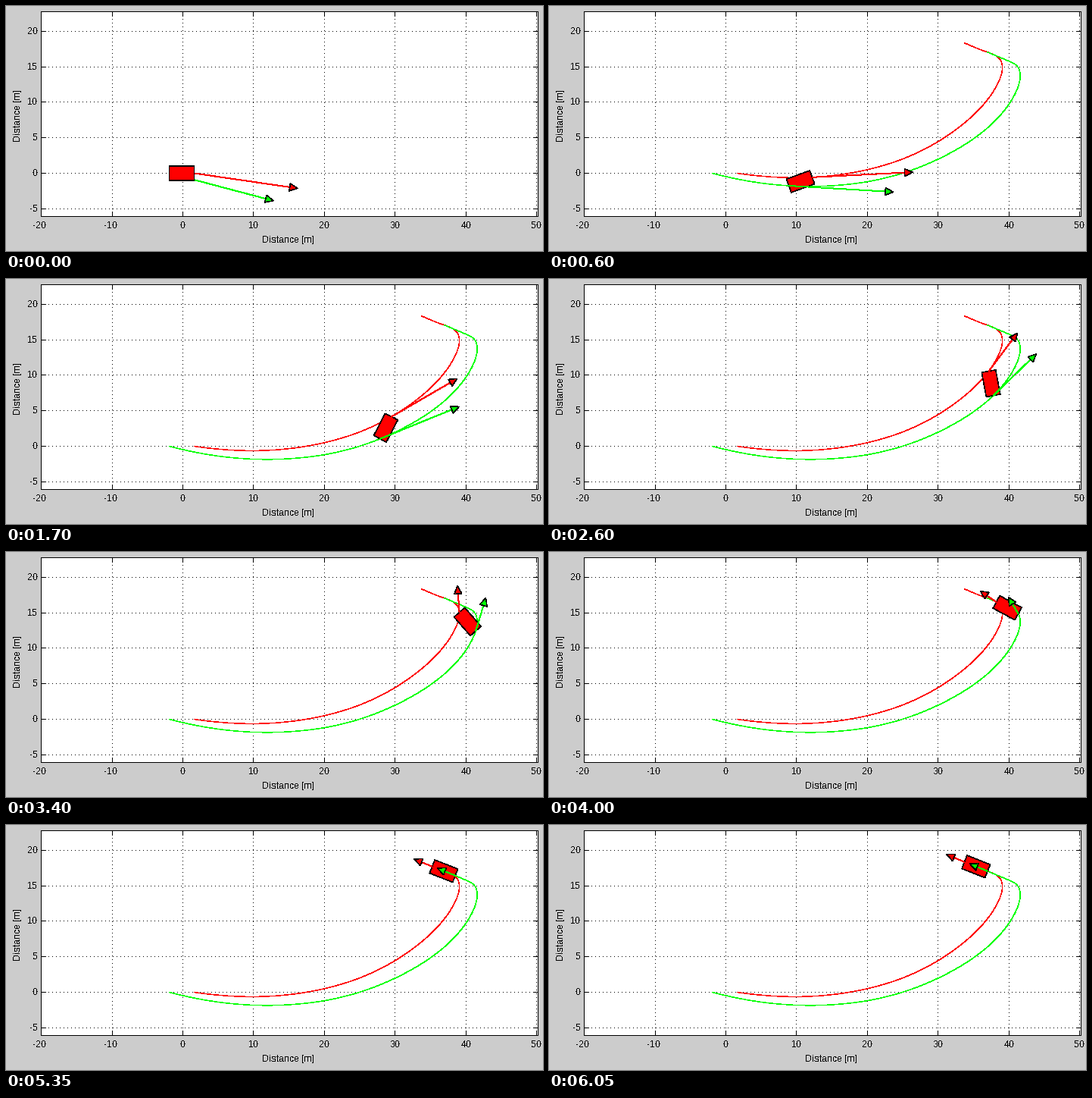
Animation of 709x323 px, one loop 6.1 s. Source, as a matplotlib script:

```python
import numpy as np
import matplotlib.pyplot as plt
from matplotlib.animation import FuncAnimation

W, H, DPI = 709, 323, 64
FRAMES, INTERVAL = 122, 50
PX = 72 / DPI  # points per pixel
THIN = 0.5 * PX  # draws as one crisp pixel without antialiasing
RED, GREEN = "#ff0000", "#00ff00"
CAR_LENGTH, CAR_WIDTH = 32.8, 18.8

plt.rcParams.update({
    "font.family": "Liberation Sans",
    "font.size": 12 * PX,
    "text.antialiased": False,
    "text.hinting": "native",
    "text.hinting_factor": 1,
    "lines.scale_dashes": False,
})

# Skid: front centre x, y and heading in degrees, every STEP frames,
# followed by a coast at constant velocity
STEP = 13
POSES = np.array([(248, 220, 0), (355.3, 224.8, 21.7), (458, 204.3, 46.5),
                  (534, 164.5, 73), (580, 121, 100.7), (597.8, 84.8, 125),
                  (592, 66.8, 149.5), (578.7, 60.5, 157.2)])
LAUNCH = np.array([8.2, 1.2, 1.7])
COAST = np.array([-1.02, -0.41, 0.03])
COAST_TIME = 3 * STEP


def spline(t, p, v0, v1, at):
    """Clamped cubic spline through points p at times t."""
    n, h = len(t), np.diff(t)
    slope = np.diff(p, axis=0) / h[:, None]
    a, b = np.eye(n), np.zeros_like(p)
    b[0], b[-1] = v0, v1
    for i in range(1, n - 1):
        a[i, i - 1:i + 2] = h[i], 2 * (h[i - 1] + h[i]), h[i - 1]
        b[i] = 3 * (h[i] * slope[i - 1] + h[i - 1] * slope[i])
    m = np.linalg.solve(a, b)
    k = np.clip(np.searchsorted(t, at, side="right") - 1, 0, n - 2)
    d = h[k][:, None]
    u = ((at - t[k]) / h[k])[:, None]
    return ((1 + 2 * u) * (1 - u) ** 2 * p[k] + u * (1 - u) ** 2 * d * m[k]
            + u * u * (3 - 2 * u) * p[k + 1] + u * u * (u - 1) * d * m[k + 1])


def directions(path):
    g = np.gradient(path, axis=0)
    return g / np.hypot(g[:, 0], g[:, 1])[:, None]


def braking(t, first, last, power):
    """Arrow length easing from first to last as the car slows down."""
    return last + (first - last) * np.cos(np.pi / 2 * min(t / 80, 1)) ** power


SUB = 8
time = np.arange((FRAMES - 1) * SUB + 1) / SUB
keys = STEP * np.arange(len(POSES))
pose = spline(np.append(keys, keys[-1] + COAST_TIME),
              np.vstack([POSES, POSES[-1] + COAST_TIME * COAST]),
              LAUNCH, COAST, time)
front, angle = pose[:, :2], np.radians(pose[:, 2])
heading = np.column_stack([np.cos(angle), -np.sin(angle)])
rear = front - CAR_LENGTH * heading
front_dir, rear_dir = directions(front), directions(rear)

fig = plt.figure(figsize=(W / DPI, H / DPI), dpi=DPI, facecolor="#cccccc")
ax = fig.add_axes([0, 0, 1, 1])
ax.set_xlim(-0.5, W - 0.5)
ax.set_ylim(H - 0.5, -0.5)
ax.axis("off")

LEFT, RIGHT, TOP, BOTTOM = 46, 702, 7, 277
TICK = 6
DOTS = dict(ls=(0, (THIN, 4.2 * PX)), dash_capstyle="butt", zorder=1)


def line(xs, ys, color="black", width=THIN, **kw):
    kw.setdefault("zorder", 2)
    return ax.plot(xs, ys, color=color, lw=width, antialiased=False,
                   snap=False, **kw)[0]


def poly(color, zorder):
    return ax.add_patch(plt.Polygon(
        [(0, 0)] * 3, closed=True, fc=color, ec="black", lw=THIN,
        antialiased=False, snap=False, zorder=zorder))


def label(x, y, text, ha="center"):
    ax.text(x, y, text, ha=ha, va="baseline")


def sideways(d):
    return np.array([-d[1], d[0]])


ax.add_patch(plt.Rectangle((LEFT, TOP), RIGHT - LEFT, BOTTOM - TOP,
                           fc="white", ec="none", zorder=0))
for value in range(-20, 51, 10):
    x = round(233 + 9.343 * value)
    if x > LEFT:
        line([x, x], [BOTTOM, TOP], **DOTS)
    line([x, x], [BOTTOM, BOTTOM - TICK])
    line([x, x], [TOP, TOP + TICK])
    label(x - 2.5 * (value < 0), 293, str(value))
for value in range(-5, 21, 5):
    y = round(219.8 - 9.35 * value)
    line([LEFT, RIGHT], [y, y], **DOTS)
    line([LEFT, LEFT + TICK], [y, y])
    line([RIGHT, RIGHT - TICK], [y, y])
    label(41.5, y + 4, str(value), ha="right")
line([LEFT, RIGHT, RIGHT, LEFT, LEFT], [BOTTOM, BOTTOM, TOP, TOP, BOTTOM])
label(372.5, 312, "Distance [m]")
ax.text(21, 144.5, "Distance [m]", rotation=90, ha="right", va="center")

tracks = [line(*front.T, RED, zorder=3), line(*rear.T, GREEN, zorder=3)]
car = poly(RED, 5)


class Arrow:
    HEAD, HALF = 10.5, 5

    def __init__(self, color):
        self.shaft = line([], [], color, PX, zorder=6, solid_capstyle="butt")
        self.head = poly(color, 7)

    def place(self, start, d, length):
        tip = start + d * length
        base = tip - d * self.HEAD
        side = sideways(d) * self.HALF
        self.shaft.set_data(*np.array([start, base]).T)
        self.head.set_xy([tip, base + side, base - side])


red_arrow, green_arrow = Arrow(RED), Arrow(GREEN)


def update(i):
    k = i * SUB
    f, r = front[k], rear[k]
    side = sideways(heading[k]) * CAR_WIDTH / 2
    car.set_xy([f + side, f - side, r - side, r + side])
    red_arrow.place(f, front_dir[k], braking(i, 138, 25.5, 1.7))
    green_arrow.place(r, rear_dir[k], braking(i, 142, 25.3, 1.2))
    # The opening pose has no tracks and its car hides the arrow's start
    for track in tracks:
        track.set_visible(i > 0)
    car.set_zorder(5 if i else 8)
    return [car, *tracks]


anim = FuncAnimation(fig, update, frames=FRAMES, interval=INTERVAL,
                     repeat=True, repeat_delay=0, blit=False)
plt.show()
```
